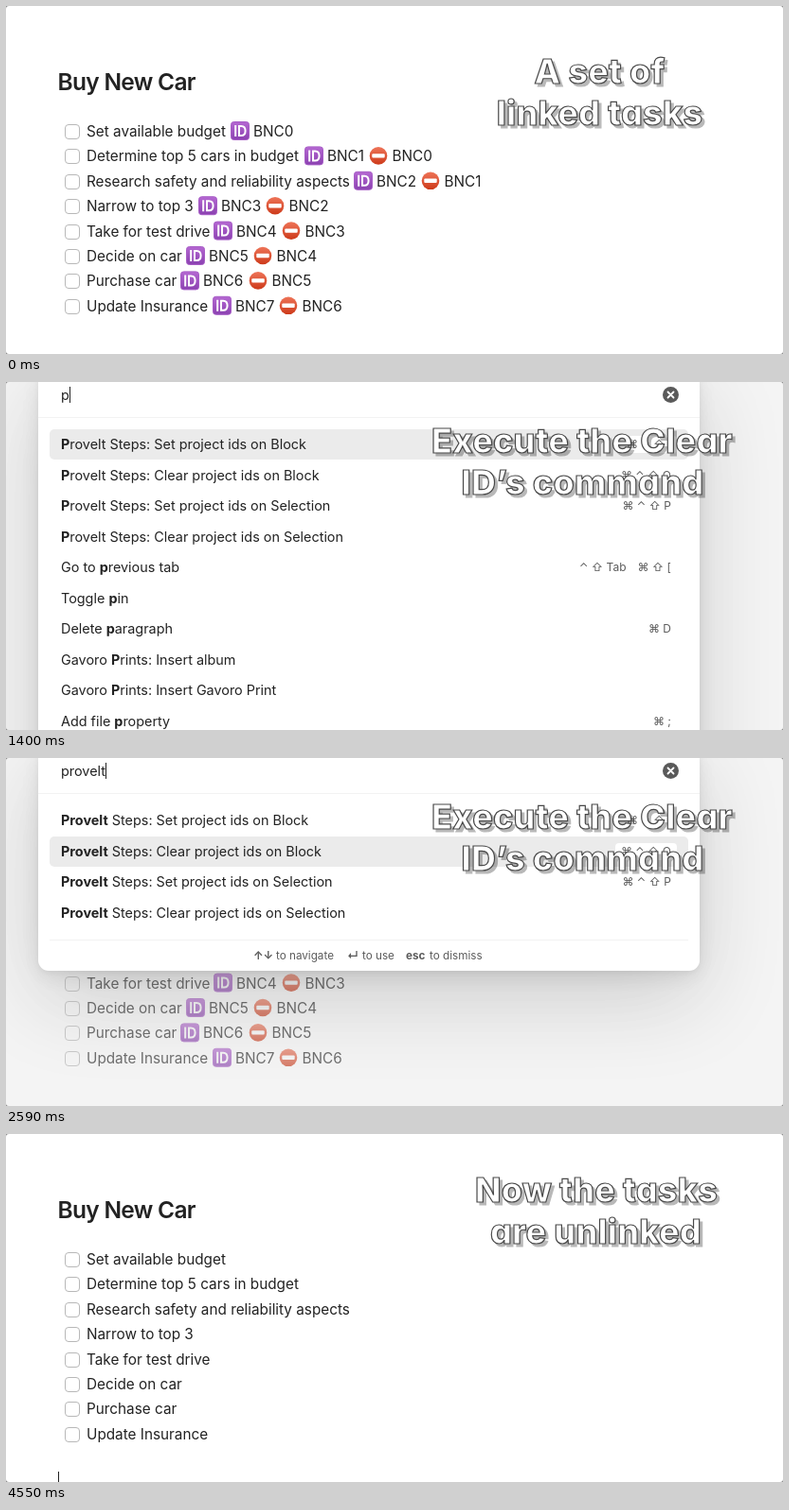
These frames come from a looping animation (820 px wide and 368 px high, 4.69 s). An HTML page:

```html
<!DOCTYPE html>
<html lang="en">
<head>
<meta charset="utf-8">
<title>Linked tasks</title>
<style>
  html, body { margin: 0; width: 100%; height: 100%; overflow: hidden; background: #858585; }
  #stage {
    position: relative; width: 820px; height: 368px; overflow: hidden;
    background: #fff; border-radius: 3px; color: #222;
    font-family: Inter, "DejaVu Sans", sans-serif; font-optical-sizing: none;
  }
  svg, .veil { position: absolute; left: 0; top: 0; width: 820px; height: 368px; }
  #doc text { font-size: 15.3px; fill: #222; }
  #doc .title { font-size: 24.5px; font-weight: 600; letter-spacing: -.7px; }
  .box { fill: #fff; stroke: #b8b8b8; }

  .veil { background: rgba(227, 227, 227, .4); }
  .modal {
    position: absolute; left: 34px; top: -13px; width: 698px; height: 470px;
    background: #fff; border-radius: 11px; font-size: 14.4px; white-space: pre;
    box-shadow: 0 1.8px 7.3px rgba(0, 0, 0, .06), 0 6.3px 24.7px rgba(0, 0, 0, .09),
      0 30px 90px rgba(0, 0, 0, .16);
  }
  .modal.short { height: 238px; }
  .modal b { font-weight: 700; }
  .query { height: 50px; padding-left: 24px; line-height: 53px; border-bottom: 1px solid #f2f2f2; }
  .query i {
    display: inline-block; width: 1px; height: 17px; background: #222; vertical-align: -3px;
  }
  .clear { position: absolute; left: 659px; top: 18px; width: 17px; height: 17px; }
  .row {
    position: absolute; left: 12px; width: 650px; height: 32px; padding: 0 12px;
    line-height: 32px; border-radius: 5px;
  }
  .row.on { background: #ebebeb; }
  .keys { position: absolute; right: 12px; top: 7px; font-size: 12px; line-height: 18px; color: #5c5c5c; }
  .keys span { padding: 0 6px; border-radius: 4px; display: inline-block; }
  .on .keys span { background: #fff; }
  .foot {
    position: absolute; left: 12px; top: 205px; width: 674px; height: 32px;
    border-top: 1px solid #f2f2f2; font-size: 11.7px; line-height: 33px; color: #5c5c5c;
  }
  .foot span { position: absolute; }

  .caption text {
    font-size: 36px; font-weight: 800; letter-spacing: .2px; text-anchor: middle;
    font-feature-settings: "cv11"; fill: #fff; stroke: #484848; stroke-width: 1.2px;
  }
  .caption { filter: drop-shadow(3px 3px 0 rgba(0, 0, 0, .28)); }
</style>
</head>
<body>
<div id="stage">
  <svg id="doc" viewBox="0 0 820 368">
    <defs>
      <linearGradient id="violet" x2="0" y2="1">
        <stop stop-color="#b568d2"/><stop offset="1" stop-color="#8a41b0"/>
      </linearGradient>
      <linearGradient id="red" x2="0" y2="1">
        <stop stop-color="#ee7458"/><stop offset="1" stop-color="#cd3a1a"/>
      </linearGradient>
      <g id="badge">
        <rect x=".5" y="-9.5" width="19" height="19" rx="3" fill="url(#violet)" stroke="#a75cc6"/>
        <path d="M5.2-6V6M9-5H11.2Q15.6-5 15.6 0T11.2 5H9Z" fill="none" stroke="#fff" stroke-width="2"/>
      </g>
      <g id="stop">
        <circle cx="9.5" r="9.3" fill="url(#red)"/>
        <rect x="2.8" y="-2.2" width="13.4" height="4.4" rx="1" fill="#fff"/>
      </g>
    </defs>
    <text class="title" x="54.5" y="89">Buy New Car</text>
    <g id="tasks"></g>
    <g id="tags"></g>
    <rect id="caret" x="55" y="357" width="1" height="11" fill="#222"/>
  </svg>
  <div id="palette"><div class="veil"></div></div>
  <svg id="captions" viewBox="0 0 820 368"></svg>
</div>
<script>
const LOOP = 4690, OPEN = 1050, CLOSE = 3500;
const $ = id => document.getElementById(id);
const sheet = document.head.appendChild(document.createElement('style'));
let count = 0;

// Shows an element only during the given [from, to] spans, in ms.
function live(el, ...spans) {
  const key = (t, on) => t > 0 && t < LOOP
    ? `${((t - 4) / LOOP * 100).toFixed(3)}%{opacity:${on}}` : '';
  const name = 'live' + count++;
  const frames = spans.map(([a, b]) => key(a, 1) + key(b, 0)).join('');
  sheet.append(`@keyframes ${name}{0%{opacity:${spans[0][0] ? 0 : 1}}${frames}}\n`);
  el.style.animation = `${name} ${LOOP}ms step-end infinite`;
}

// Task text, x of its id badge, x of its dependency sign
const tasks = [
  ['Set available budget', 237],
  ['Determine top 5 cars in budget', 315, 383.5],
  ['Research safety and reliability aspects', 367, 438.5],
  ['Narrow to top 3', 203, 274.5],
  ['Take for test drive', 219, 291.5],
  ['Decide on car', 190, 261.5],
  ['Purchase car', 184, 256.5],
  ['Update Insurance', 218, 288.5]
];
const tag = (icon, x, y, n) =>
  `<use href="#${icon}" x="${x}" y="${y - 6}"/><text x="${x + 24}" y="${y}">BNC${n}</text>`;

tasks.forEach(([text, idX, depX], i) => {
  const y = 138 + 26.4 * i;
  $('tasks').innerHTML +=
    `<rect class="box" x="62.5" y="${Math.round(y - 13) + .5}" width="15" height="15" rx="3.5"/>` +
    `<text x="85" y="${y}">${text}</text>`;
  $('tags').innerHTML += tag('badge', idX, y, i) + (depX ? tag('stop', depX, y, i - 1) : '');
});
live($('tags'), [0, CLOSE]);
live($('caret'), [560, OPEN], [CLOSE, 3990], [4550, LOOP]);

const commands = [
  ['Provelt Steps: Set project ids on Block', '⌘ ⌃ ⇧ I'],
  ['Provelt Steps: Clear project ids on Block', '⌘ ⌃ ⇧ O'],
  ['Provelt Steps: Set project ids on Selection', '⌘ ⌃ ⇧ P'],
  ['Provelt Steps: Clear project ids on Selection'],
  ['Go to previous tab', '⌃ ⇧ Tab', '⌘ ⇧ ['],
  ['Toggle pin'],
  ['Delete paragraph', '⌘ D'],
  ['Gavoro Prints: Insert album'],
  ['Gavoro Prints: Insert Gavoro Print'],
  ['Add file property', '⌘ ;']
];
const clear = `<svg class="clear" viewBox="-8.5 -8.5 17 17"><circle r="8.5" fill="#5a5a5a"/>
  <path d="M-3-3 3 3M3-3-3 3" stroke="#fff" stroke-width="1.8" stroke-linecap="round"/></svg>`;
const foot = '<div class="foot">' + [
  [215, '<b>↑↓</b>'], [239, 'to navigate'], [314, '<b>↵</b>'], [330, 'to use'],
  [376, '<b>esc</b>'], [401, 'to dismiss']
].map(([x, s]) => `<span style="left:${x}px">${s}</span>`).join('') + '</div>';

function modal(query, picked) {
  const short = query.length > 3;
  const rows = commands.slice(0, short ? 4 : 10).map(([text, ...keys], i) => {
    const label = query ? text.replace(new RegExp(query, 'i'), '<b>$&</b>') : text;
    const hints = keys.map(k => `<span>${k}</span>`).join('');
    return `<div class="row${i === picked ? ' on' : ''}" style="top:${Math.round(63 + 32.5 * i)}px">` +
      `${label}<div class="keys">${hints}</div></div>`;
  });
  const el = document.createElement('div');
  el.className = short ? 'modal short' : 'modal';
  el.innerHTML = `<div class="query">${query}<i></i></div>${clear}${rows.join('')}${short ? foot : ''}`;
  return $('palette').appendChild(el);
}

// Start time, letters typed, selected row
const steps = [
  [OPEN, 0, 0], [1330, 1, 0], [1470, 2, 0], [1540, 3, 0], [1680, 4, 0],
  [1750, 5, 0], [1890, 6, 0], [2100, 7, 0], [2590, 7, 1]
];
steps.forEach(([from, typed, picked], i) => {
  const last = i === steps.length - 1;
  const el = modal('provelt'.slice(0, typed), picked);
  live(el, [from, last ? CLOSE : steps[i + 1][0]]);
  if (last) live(el.querySelector('i'), [from, 2660], [3150, CLOSE]);
});
live($('palette'), [OPEN, CLOSE]);

// Span, first baseline, then centre and text of each line
const captions = [
  [[0, 910], 81.5, [626.5, 'A set of'], [626.5, 'linked tasks']],
  [[1190, 3220], 74.5, [608, 'Execute the Clear'], [608.5, 'ID’s command']],
  [[3570, LOOP], 72, [623, 'Now the tasks'], [622.5, 'are unlinked']]
];
$('captions').innerHTML = captions.map(([, y, ...lines]) => '<g class="caption">' +
  lines.map(([x, s], i) => `<text x="${x}" y="${y + 44.3 * i}">${s}</text>`).join('') + '</g>').join('');
captions.forEach(([span], i) => live($('captions').children[i], span));
</script>
</body>
</html>
```
